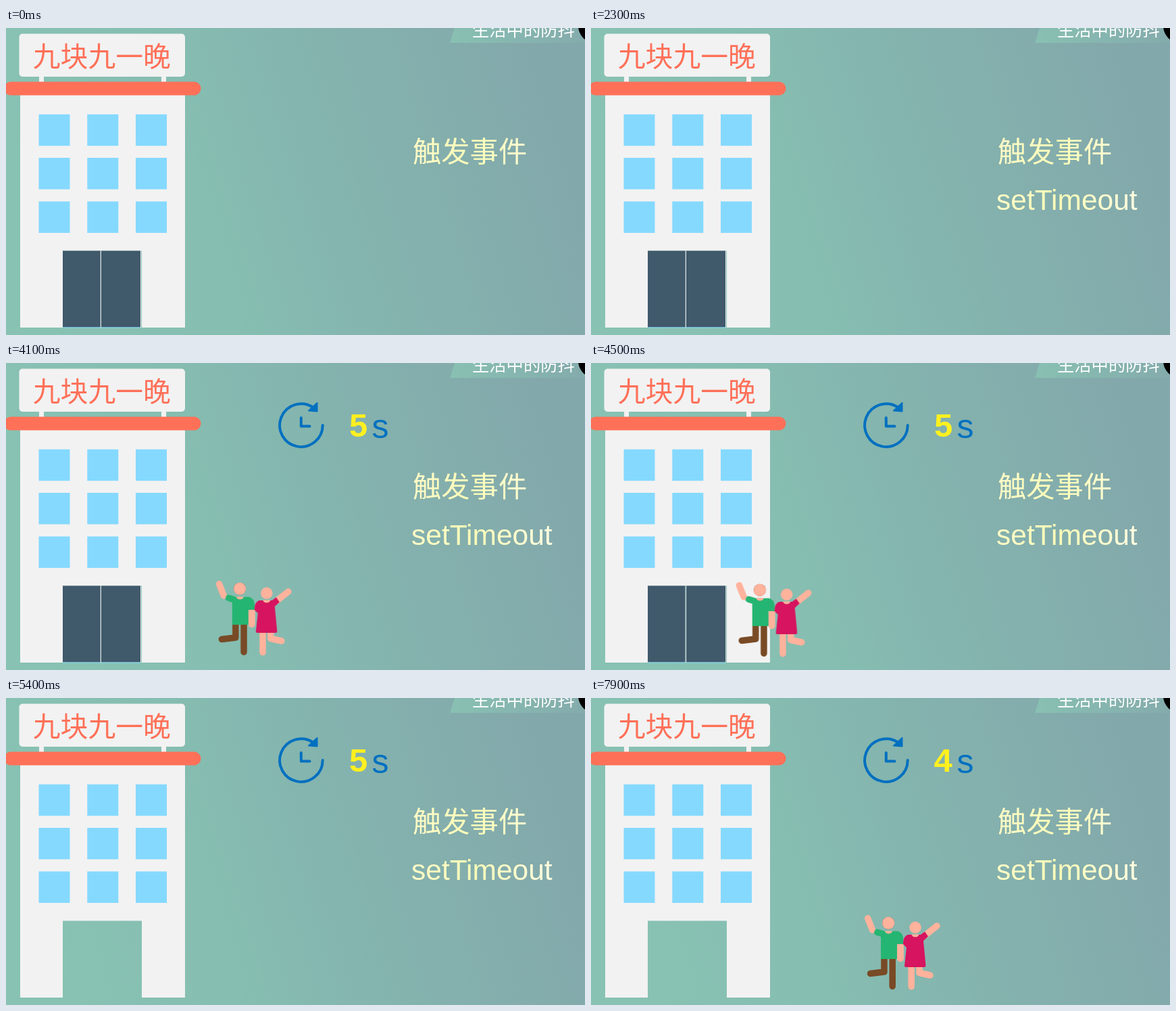
Animation of 857 by 454 pixels, one loop 8000 ms. Source, as an HTML page:

```html
<!DOCTYPE html>
<html lang="zh-CN">
<head>
<meta charset="utf-8">
<title>防抖</title>
<style>
html, body { margin: 0; width: 100%; height: 100%; overflow: hidden; background: #86b5ae; }
svg { display: block; width: 100%; height: 100%; }
.zh { font-family: "Noto Sans CJK SC", "Noto Sans CJK", sans-serif; font-weight: 500; }
.en { font-family: "Liberation Sans", Arial, sans-serif; }
.limb { fill: none; stroke-linecap: round; stroke-linejoin: round; stroke-width: 9.5; }
.skin { stroke: #ffb29c; }
.shirt { stroke: #25b572; }
.trousers { stroke: #784a25; }
.dress { stroke: #d6145f; }

/* one 8 s timeline: 1% = 80 ms */
.anim { animation: 8s linear infinite both; }
#wipe { animation-name: wipe; }
#timer { animation-name: timer; }
#five { animation-name: five; }
#four { animation-name: four; }
#couple { animation-name: show; }
#walker { animation-name: walk; }
#doorL { animation-name: openL; }
#doorR { animation-name: openR; }

@keyframes wipe {
  0%, 16.24% { transform: translateX(-214px); }
  16.25% { transform: translateX(-183px); }
  23.75%, 100% { transform: none; }
}
@keyframes timer {
  0%, 33.74% { opacity: 0; }
  33.75%, 100% { opacity: 1; }
}
@keyframes five {
  0%, 91.24% { opacity: 1; }
  91.25%, 100% { opacity: 0; }
}
@keyframes four {
  0%, 91.24% { opacity: 0; }
  91.25%, 100% { opacity: 1; }
}
@keyframes show {
  0%, 39.99% { opacity: 0; }
  40%, 61.25% { opacity: 1; }
  67.5%, 96.24% { opacity: 0; }
  96.25%, 100% { opacity: 1; }
}
@keyframes walk {
  0%, 45.625% { transform: translate(0, 0); }
  51.25% { transform: translate(-94px, 1px); }
  56.25% { transform: translate(-190px, 3px); }
  60% { transform: translate(-290px, 6px); }
  62.5%, 67.5% { transform: translate(-320px, 8px); }
  67.51%, 100% { transform: translate(0, 0); }
}
@keyframes openL {
  0%, 56.25% { transform: none; }
  60% { transform: translateX(-40px); }
  61.6%, 100% { transform: translateX(-60px); }
}
@keyframes openR {
  0%, 56.25% { transform: none; }
  60% { transform: translateX(39px); }
  61.6%, 100% { transform: translateX(61px); }
}
</style>
</head>
<body>
<svg viewBox="0 0 857 454" preserveAspectRatio="none">
  <defs>
    <linearGradient id="sky" gradientUnits="userSpaceOnUse" x1="90" y1="400" x2="830" y2="170">
      <stop offset="0" stop-color="#88c2b3"/>
      <stop offset=".3" stop-color="#86beb1"/>
      <stop offset=".6" stop-color="#84b3ae"/>
      <stop offset="1" stop-color="#83a8ab"/>
    </linearGradient>
    <linearGradient id="ribbon">
      <stop offset="0" stop-color="#88c0b2"/>
      <stop offset="1" stop-color="#84abac"/>
    </linearGradient>
    <linearGradient id="cream" gradientUnits="userSpaceOnUse" x1="602" y1="0" x2="810" y2="0">
      <stop offset="0" stop-color="#fffbc6"/>
      <stop offset=".45" stop-color="#fafcb8"/>
      <stop offset="1" stop-color="#fffde0"/>
    </linearGradient>
    <clipPath id="reveal"><rect id="wipe" class="anim" x="598" y="225" width="214" height="60"/></clipPath>
    <clipPath id="doorway"><rect x="84" y="329.5" width="117" height="114.5"/></clipPath>
    <rect id="pane" width="46" height="46.5" fill="#85d9ff"/>
    <g id="row">
      <use href="#pane" x="48.5"/>
      <use href="#pane" x="120.3"/>
      <use href="#pane" x="192"/>
    </g>
  </defs>

  <rect width="857" height="454" fill="url(#sky)"/>

  <!-- heading -->
  <path d="M664 0H857V22H657Z" fill="url(#ribbon)"/>
  <text class="zh" x="690" y="11.5" font-size="25.3" fill="#fff">生活中的防抖</text>
  <circle cx="872" cy="-3" r="25"/>

  <!-- hotel -->
  <g fill="#f2f2f2">
    <path fill-rule="evenodd" d="M21 98H265V443H21ZM84 329.5V443H201V329.5Z"/>
    <rect x="19.5" y="8.5" width="245.5" height="63.5" rx="5"/>
    <path d="M49 70h7v12h-7zM230 70h7v12h-7z"/>
  </g>
  <rect x="-3" y="79.5" width="291.5" height="20" rx="10" fill="#ff7058"/>
  <text class="zh" x="39.8" y="56.5" font-size="40.8" fill="#ff7058">九块九一晚</text>
  <use href="#row" y="127.7"/>
  <use href="#row" y="192"/>
  <use href="#row" y="256.5"/>
  <g clip-path="url(#doorway)">
    <g id="doorL" class="anim">
      <rect x="84" y="329.5" width="56" height="113" fill="#40596b"/>
      <path d="M84 443h57" stroke="#85d9ff" stroke-width="1.2"/>
      <path d="M140.3 329.5V443" stroke="#dfe6e8" stroke-width="1.2"/>
    </g>
    <g id="doorR" class="anim">
      <rect x="141" y="329.5" width="58" height="113" fill="#40596b"/>
      <path d="M141 443h58" stroke="#85d9ff" stroke-width="1.2"/>
      <path d="M199.5 329.5V443" stroke="#eef2f2"/>
    </g>
  </g>

  <!-- calls -->
  <g fill="url(#cream)">
    <text class="zh" x="602" y="198" font-size="42.3">触发事件</text>
    <g clip-path="url(#reveal)">
      <text class="en" x="600" y="268.5" font-size="42.5">setTimeout</text>
    </g>
  </g>

  <!-- countdown -->
  <g id="timer" class="anim">
    <g fill="none" stroke="#0070c0" stroke-width="4" stroke-linecap="round">
      <path d="M468.7 92A31.8 31.8 0 1 1 454 65.3"/>
      <path d="M436.8 81V93.5H449.5" stroke-linejoin="round"/>
    </g>
    <path d="M460.5 59V71.5L448 70.5Z" fill="#0070c0" stroke="#0070c0" stroke-width="2" stroke-linejoin="round"/>
    <g class="en" font-weight="700" font-size="49" fill="#fff01f">
      <text id="five" class="anim" x="508" y="108.5">5</text>
      <text id="four" class="anim" x="507.5" y="108.5">4</text>
    </g>
    <text class="en" x="541.5" y="111" font-size="50" fill="#0070c0">s</text>
  </g>

  <!-- guests -->
  <g id="couple" class="anim">
    <g id="walker" class="anim">
      <path class="limb skin" d="M409.7 325.7L416.5 343M458 362V385.5"/>
      <path class="limb trousers" d="M446.2 384V426.5M434 384V405L413.5 407.5" stroke-width="10"/>
      <path class="limb shirt" d="M424 346.5L434 349.5H452Q457.5 350.5 457.5 359.5" stroke-linecap="butt"/>
      <path d="M422 341.5L431 345H452Q462 346 462 357V364H453V386H429V352.5L419 348.5Z" fill="#25b572"/>
      <path d="M435 344.5a5.5 4 0 0 0 11 0Z" fill="#ffb29c"/>
      <circle cx="440.2" cy="332.7" r="9"/>
      <circle cx="440.2" cy="332.7" r="9.2" fill="#ffb29c"/>

      <path class="limb skin" d="M512 337L495 350.5" stroke-width="9"/>
      <path class="limb skin" d="M474.2 396V426.8M486 396V406.5L502 410" stroke-width="9"/>
      <path d="M469 350H488L494 345.5L499 352.5L492 359L495.5 396Q495.5 398 493.5 398H466Q464 398 464 396L467 369L462 364Q462 352 469 350Z" fill="#d6145f"/>
      <path d="M474.5 349.5a5.5 4 0 0 0 11 0Z" fill="#ffb29c"/>
      <circle cx="480" cy="339.3" r="8.7" fill="#ffb29c"/>
      <path class="limb skin" d="M457.8 368.5V385.5"/>
    </g>
  </g>
</svg>
</body>
</html>
```
